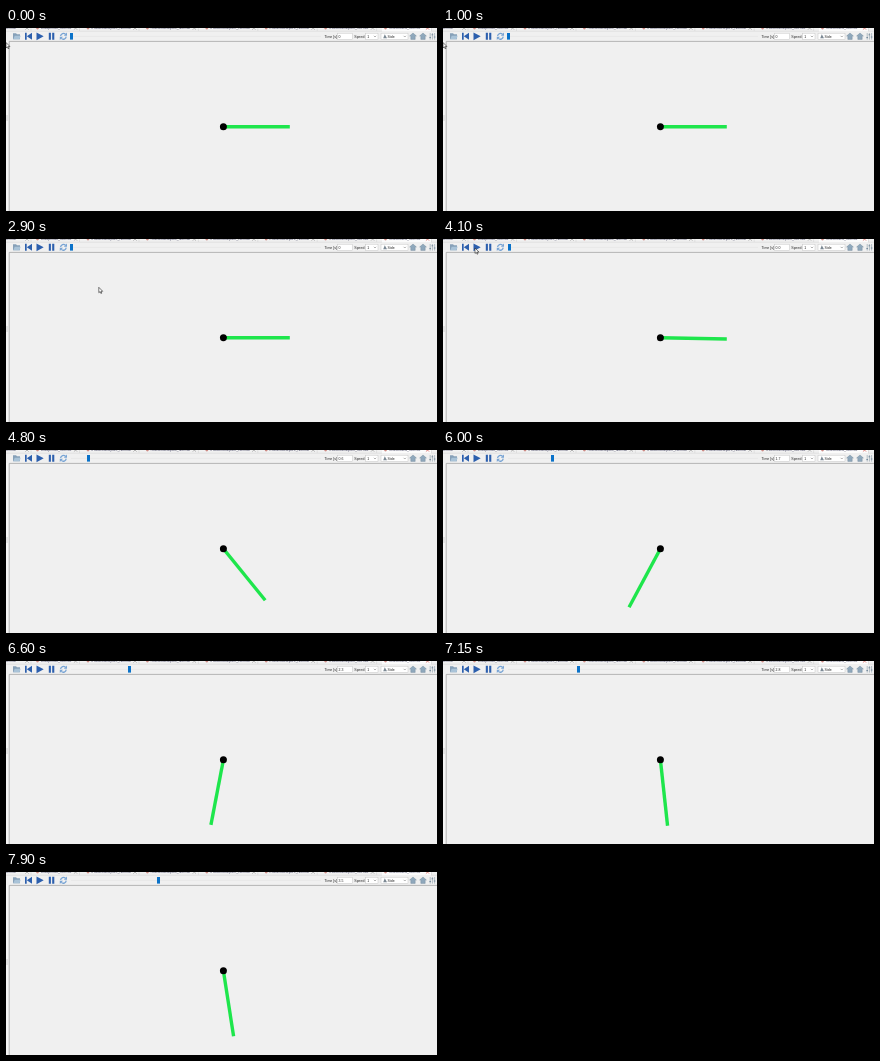
These frames come from a looping animation (431x183 px, 8000 ms). An HTML page:

```html
<!DOCTYPE html>
<html lang="en">
<head>
<meta charset="utf-8">
<title>Pendulum playback</title>
<style>
  html, body { margin: 0; width: 100%; height: 100%; overflow: hidden; background: #f0f0f0; }
  svg { display: block; width: 431px; height: 183px; }
  text { font: 3.5px "Liberation Sans", Arial, sans-serif; fill: #222; }
  .tab { fill: #4a4a68; }
  .blue { fill: #2c5fad; }
  .box { fill: #fff; stroke: #c4c4c4; stroke-width: .5; }
  .chevron { fill: none; stroke: #666; stroke-width: .5; }
</style>
</head>
<body>
<svg viewBox="0 0 431 183">
  <rect width="431" height="183" fill="#f0f0f0"/>

  <g id="tabs">
    <rect x="376" width="49" height="3" fill="#fbfbfb"/>
    <path d="M0 3.2H376M425 3.2H431" stroke="#d4d4d4" stroke-width=".6"/>
  </g>

  <!-- view frame and splitter -->
  <rect y="13" width="2.6" height="170" fill="#f5f5f5"/>
  <path d="M431 13.4H3.2V183" fill="none" stroke="#a6a6a6" stroke-width=".8"/>
  <path d="M1 87v6" stroke="#bbb" stroke-width=".6"/>

  <!-- toolbar -->
  <path d="M7 5.3h3l1 1h3v5H7z" fill="#86a0b8"/>
  <path d="M7.3 11.2l1.4-3.4h6l-1.2 3.4z" fill="#a9c3d8"/>
  <path class="blue" d="M19 4.8h1.7v7H19zM26 4.8v7l-5.2-3.5z"/>
  <path class="blue" d="M30.5 4.4l7.2 3.9-7.2 3.9z"/>
  <path class="blue" d="M42.8 4.8h2.1v7h-2.1zM46.2 4.8h2.1v7h-2.1z"/>
  <g fill="none" stroke="#78a4d4" stroke-width="1.3">
    <path d="M54.6 8A2.9 2.9 0 0 1 59.5 6.2M60.2 8.6A2.9 2.9 0 0 1 55.3 10.4"/>
  </g>
  <path d="M61 4.6v3.2h-3.2zM53.8 12V8.8H57z" fill="#78a4d4"/>
  <path d="M65 8.3H315" stroke="#e6e6e6" stroke-width=".8"/>
  <rect id="thumb" y="5" width="3" height="6.6" fill="#0a72c9"/>

  <text x="318.6" y="9.7">Time [s]:</text>
  <rect class="box" x="331.3" y="5.2" width="15.2" height="6.4"/>
  <text id="clock" x="332.6" y="9.7">0</text>
  <text x="348.3" y="9.7">Speed:</text>
  <rect class="box" x="359.6" y="5.2" width="12.4" height="6.4"/>
  <text x="361.2" y="9.7">1</text>
  <path class="chevron" d="M367.8 7.8l1.2 1.2 1.2-1.2"/>
  <rect class="box" x="375" y="5.2" width="27" height="6.4"/>
  <path d="M377.2 10.2l1.6-4 2.2 4z" fill="#7c8994"/>
  <text x="381.6" y="9.7">Side</text>
  <path class="chevron" d="M397.6 7.8l1.2 1.2 1.2-1.2"/>
  <g id="views" fill="#8fa8bc" stroke="#6f8799" stroke-width=".4"></g>
  <path d="M424.2 5v6.6M426.4 5v6.6M428.6 5v6.6" stroke="#97a6b2" stroke-width=".7"/>
  <path d="M423.4 9.6h1.6M425.6 6.8h1.6M427.8 9h1.6" stroke="#71879a" stroke-width="1"/>

  <!-- pendulum -->
  <path id="rod" stroke="#1ee64c" stroke-width="3.4"/>
  <circle cx="217.4" cy="98.7" r="3.5"/>

  <path id="cursor" d="M0 0V5.4L1.3 4.3L2.1 6.2L3 5.8L2.2 4H3.9Z"
        fill="#fff" stroke="#222" stroke-width=".6"/>
</svg>
<script>
const LOOP = 8000, TICK = 50;
const NS = 'http://www.w3.org/2000/svg';
const $ = id => document.getElementById(id);

function add(parent, tag, attrs, text = '') {
  const el = document.createElementNS(NS, tag);
  for (const k in attrs) el.setAttribute(k, attrs[k]);
  el.textContent = text;
  parent.append(el);
}

function addTab(x, label, end, active) {
  const tabs = $('tabs');
  if (x > 0) add(tabs, 'circle', { cx: x, cy: 0, r: 1.4, fill: '#cd8a84' });
  add(tabs, 'text', { x: x + 3.4, y: 1.2, class: 'tab' }, label);
  add(tabs, 'path', {
    d: `M${end - 1.6} -1.6l3.2 3.2m0 -3.2l-3.2 3.2`,
    stroke: active ? '#d0392f' : '#858585', 'stroke-width': .6
  });
  add(tabs, 'path', { d: `M${end + 4} 0v3`, stroke: '#cfcfcf', 'stroke-width': .5 });
}

addTab(-8, '/_Normal', 21);
addTab(31.5, 'Datapend0_Normal', 69.5);
for (let i = 0; i < 5; i++) addTab(82 + 59.4 * i, '/Hardcoded/pure_Normal', 129 + 59.4 * i);
addTab(379.5, '/Hardcoded_Normal', 421.5, true);

for (const x of [407, 417])
  add($('views'), 'path', { d: `M${x - 3.4} 8l3.4-3 3.4 3h-1.2v3.4h-4.4V8z` });

// Damped pendulum, integrated once; angle is measured from straight down.
const START = 4000, STEP = 2;
const angles = [];
for (let a = Math.PI / 2, v = 0, t = START; t <= LOOP; t += STEP) {
  angles.push(a);
  v += (-3.85 * Math.sin(a) - 1.18 * v) * STEP / 1000;
  a += v * STEP / 1000;
}
const angleAt = t => angles[Math.max(0, Math.floor((t - START) / STEP))];

// time, x, y
const path = [
  [0, 0, 14.5], [1450, 0, 14.5], [2000, 54, 41.5], [2150, 54, 41.5],
  [2200, 92.8, 48.3], [3050, 92.8, 48.3], [3600, 32, 9], [LOOP, 32, 9]
];
const HIDE = 4600;

function cursorAt(t) {
  const i = path.findIndex(p => p[0] > t);
  const [t0, x0, y0] = path[i - 1], [t1, x1, y1] = path[i];
  const k = (t - t0) / (t1 - t0), e = k * k * (3 - 2 * k);
  return [x0 + (x1 - x0) * e, y0 + (y1 - y0) * e];
}

function draw(now) {
  const t = Math.floor(now % LOOP / TICK) * TICK;
  const a = angleAt(t), run = Math.max(0, t - 4090) / 1000;
  $('rod').setAttribute('d',
    `M217.4 98.7l${66.4 * Math.sin(a)} ${66.4 * Math.cos(a)}`);
  $('thumb').setAttribute('x', 64 + Math.ceil(run * 22.8));
  $('clock').textContent = run ? (Math.floor(run * 9.4) / 10).toFixed(1) : '0';
  $('cursor').setAttribute('transform', `translate(${cursorAt(t)})`);
  $('cursor').setAttribute('visibility', t < HIDE ? 'visible' : 'hidden');
}

function frame() {
  draw(performance.now());
  requestAnimationFrame(frame);
}
frame();
</script>
</body>
</html>
```
